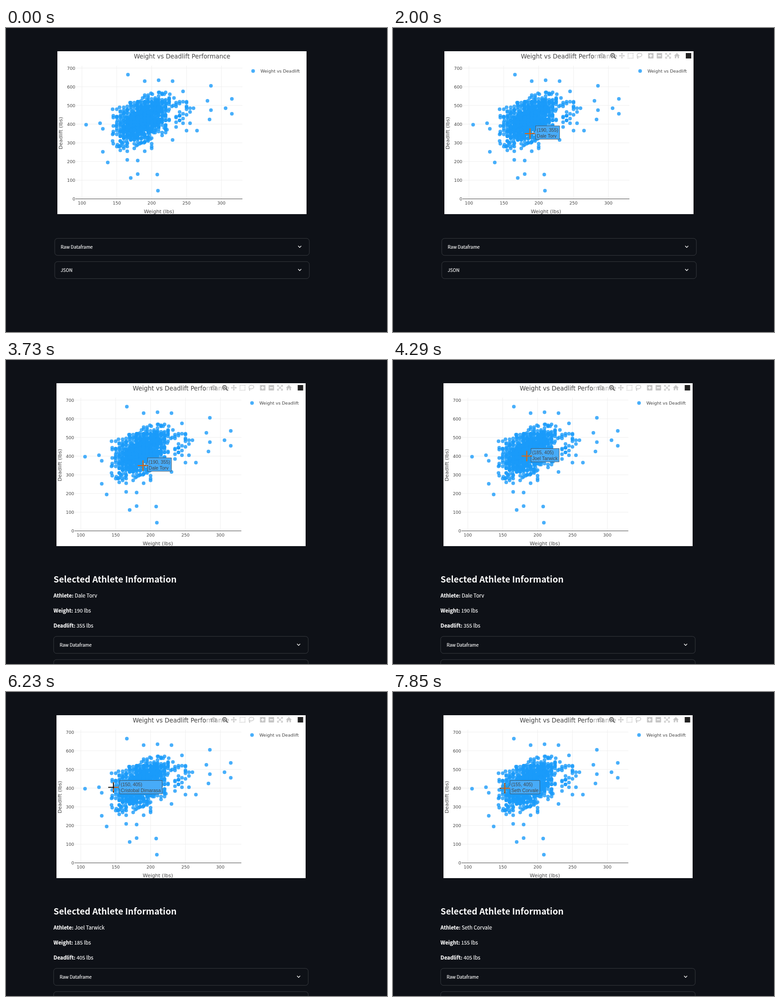
Recreate the animation shown at these times as an HTML page. Size 838 by 668 pixels, loop 8000 ms.

```html
<!DOCTYPE html>
<html lang="en">
<head>
<meta charset="utf-8">
<title>Weight vs Deadlift</title>
<style>
  html, body { margin: 0; width: 100%; height: 100%; overflow: hidden; background: #0e1117; }
  svg { display: block; }
  .plot text { font-family: "DejaVu Sans", Verdana, sans-serif; fill: #444; }
  .plot .tip text { font: 10.35px "Liberation Sans", Arial, sans-serif; }
  .page text { font-family: "Noto Sans CJK JP", "Noto Sans CJK SC", "Noto Sans", sans-serif; fill: #fafafa; }
  .page .body, .page .label { stroke: #fafafa; stroke-width: .2px; }
  .tick { font-size: 9.48px; }
  .axis { font-size: 11.05px; }
  .body { font-size: 11.3px; }
  .label { font-size: 9.95px; }
  .strong { font-weight: 700; }
  .hot text { fill: #ff4b4b; stroke: #ff4b4b; }
  .hot path { stroke: #ff4b4b; }
  #cross { mix-blend-mode: difference; }
</style>
</head>
<body>
<svg id="stage" width="838" height="668" viewBox="0 0 838 668">
  <rect width="838" height="668" fill="#0e1117"/>
  <g id="content">
    <g class="plot">
      <rect x="113" y="51" width="548" height="358" fill="#fff" shape-rendering="crispEdges"/>
      <g id="grid"></g>
      <g id="dots" fill="#1a9bfa" fill-opacity=".8"></g>
      <text x="387.3" y="66.7" font-size="13.43" text-anchor="middle">Weight vs Deadlift Performance</text>
      <text class="axis" x="336.5" y="406.6" text-anchor="middle">Weight (lbs)</text>
      <text class="axis" transform="translate(124.3 231) rotate(-90)" text-anchor="middle">Deadlift (lbs)</text>
      <text class="tick" x="559.7" y="97.8">Weight vs Deadlift</text>
      <g id="modebar"></g>
      <g id="tip" class="tip">
        <path fill="#47abf8" stroke="#444" stroke-width=".8"/>
        <text x="11.2" y="-2.2"></text><text x="11.2" y="11.2"></text>
      </g>
    </g>
    <g class="page">
      <g id="info">
        <text class="strong" x="107" y="489" font-size="19.1">Selected Athlete Information</text>
        <text class="body" x="107" y="521.5"><tspan class="strong">Athlete:</tspan> <tspan class="value"></tspan></text>
        <text class="body" x="107" y="555"><tspan class="strong">Weight:</tspan> <tspan class="value"></tspan></text>
        <text class="body" x="107" y="587.5"><tspan class="strong">Deadlift:</tspan> <tspan class="value"></tspan></text>
      </g>
      <g id="expanders"></g>
    </g>
  </g>
  <path id="cross" d="M-11.5 0H11.5M0 -11.5V11.5" stroke="#fff" stroke-width="2.2" fill="none"/>
  <path id="arrow" d="M0 0V15L3.5 11.8L5.8 17L8.2 16L6 10.8H10.6Z" fill="#fff" stroke="#000" stroke-width=".9"/>
  <path id="hand" d="M-1.6 1.2Q0 -1 1.6 1.2V6L9 7.6Q10.4 8 10 10L8.6 17H0L-5.6 10.4Q-5 8.4 -3 9.4L-1.6 10.6Z" fill="#fff" stroke="#000" stroke-width=".9"/>
</svg>
<script>
const LOOP = 8000;
const STEP = 70;
const HOVER_REACH = 16;
const $ = id => document.getElementById(id);
const toX = weight => 167 + 1.534 * (weight - 100);
const toY = lift => 375.5 - 0.4107 * lift;
const show = (node, on) => node.setAttribute('display', on ? 'inline' : 'none');
const clamp = v => Math.max(0, Math.min(1, v));

function drawGrid() {
  let out = '';
  for (let w = 100; w <= 300; w += 50) {
    out += `<path d="M${toX(w)} 83V375" stroke="#eee"/>` +
      `<text class="tick" x="${toX(w)}" y="388" text-anchor="middle">${w}</text>`;
  }
  for (let d = 0; d <= 700; d += 100) {
    out += `<path d="M153 ${toY(d)}H520" stroke="${d ? '#eee' : '#444'}"/>` +
      `<text class="tick" x="152.3" y="${toY(d) + 3.5}" text-anchor="end">${d}</text>`;
  }
  $('grid').innerHTML = out;
}

function seeded(seed) {
  return () => {
    seed = (seed + 0x6d2b79f5) | 0;
    let n = Math.imul(seed ^ (seed >>> 15), 1 | seed);
    n = (n + Math.imul(n ^ (n >>> 7), 61 | n)) ^ n;
    return ((n ^ (n >>> 14)) >>> 0) / 4294967296;
  };
}

// Athletes far from the crowd: weight, lift.
const outliers = [
  [106, 397], [126, 405], [130, 375], [130, 252], [137, 195], [165, 209], [180, 205],
  [170, 112], [180, 133], [208, 130], [209, 44], [166, 665], [190, 630], [210, 635],
  [230, 630], [245, 575], [285, 605], [280, 525], [315, 535], [306, 485], [315, 455],
  [285, 475], [283, 425], [265, 365], [250, 365], [230, 315]
];

function drawDots() {
  const rand = seeded(7);
  const bell = () => (rand() + rand() + rand() + rand() - 2) * 1.73;
  const snap = (v, step) => Math.round(v / step) * step;
  const dots = [...outliers];
  const scatter = (count, weight, width, lift, height) => {
    for (let i = 0; i < count; i++) {
      dots.push([snap(weight + rand() * width, 5), snap(lift + rand() * height, 5)]);
    }
  };
  scatter(26, 233, 28, 400, 125);
  scatter(14, 145, 58, 255, 50);
  for (let i = 0; i < 1000; i++) {
    const weight = Math.max(144, snap(187 + 18 * bell(), rand() < 0.65 ? 5 : 1));
    const offset = Math.max(-125, Math.min(125, 52 * bell()));
    dots.push([weight, Math.min(570, snap(428 + 1.45 * (weight - 190) + offset, 5))]);
  }
  $('dots').innerHTML = '<circle cx="543.5" cy="94.5" r="4"/>' + dots.map(([w, d]) =>
    `<circle cx="${toX(w).toFixed(1)}" cy="${toY(d).toFixed(1)}" r="4"/>`).join('');
}

function drawModebar() {
  const icon = (x, shape, alpha = 0.3) =>
    `<g transform="translate(${x} 61)" opacity="${alpha}" fill="#444">${shape}</g>`;
  const line = (d, width = 1.5) => `<path d="${d}" fill="none" stroke="#444" stroke-width="${width}"/>`;
  const box = '<rect x="-6" y="-6" width="12" height="12" rx="1.2"/>';
  const bar = '<path d="M-3.5 0H3.5" stroke="#fff" stroke-width="2"/>';
  $('modebar').innerHTML =
    '<rect x="443" y="52" width="217" height="18" fill="#fff" fill-opacity=".55"/>' +
    icon(459, '<path d="M-6.5 -3.5H-3L-2 -5.5H2L3 -3.5H6.5V5H-6.5Z"/><circle cy=".6" r="2.9" fill="#fff"/><circle cy=".6" r="1.6"/>') +
    icon(484, '<circle cx="-1" cy="-1" r="4" fill="none" stroke="#444" stroke-width="2"/>' +
      line('M2 2L6 6', 2.4) + line('M-3 -1H1M-1 -3V1', 1.2), 0.8) +
    icon(503.5, line('M-5 0H5M0 -5V5') +
      '<path d="M-6.5 0l3 -2.6v5.2zM6.5 0l-3 -2.6v5.2zM0 -6.5l-2.6 3h5.2zM0 6.5l-2.6 -3h5.2z"/>') +
    icon(522.5, '<rect x="-5.5" y="-5.5" width="11" height="11" fill="none" stroke="#444" stroke-width="1.6" stroke-dasharray="2.2 1.4"/>') +
    icon(542, '<ellipse cx=".4" cy="-1.5" rx="5.4" ry="4" fill="none" stroke="#444" stroke-width="1.5" transform="rotate(-12)"/>' +
      line('M-4 1.5Q-6 3 -4 4T-4.5 6.5')) +
    icon(567, box + bar + '<path d="M0 -3.5V3.5" stroke="#fff" stroke-width="2"/>') +
    icon(586, box + bar) +
    icon(605, line('M-4 -4L4 4M-4 4L4 -4') +
      line('M-5.5 -2V-5.5H-2M2 -5.5H5.5V-2M5.5 2V5.5H2M-2 5.5H-5.5V2')) +
    icon(624.5, '<path d="M0 -6L6.5 0H4.6V5.5H1.4V1.5H-1.4V5.5H-4.6V0H-6.5Z"/>') +
    '<rect x="644" y="55" width="12" height="12" fill="#222"/>';
}

function drawExpanders() {
  $('expanders').innerHTML = ['Raw Dataframe', 'JSON'].map((label, i) =>
    `<g transform="translate(0 ${i * 51})">
      <rect x="107.2" y="462.3" width="560" height="37.4" rx="6.3" fill="none" stroke="#3d4045" stroke-width=".9"/>
      <text class="label" x="120.3" y="485">${label}</text>
      <path d="M642.6 478.8L646 482.2L649.4 478.8" fill="none" stroke="#fafafa" stroke-width="1.4"/>
    </g>`).join('');
}

const person = (name, weight, lift) => ({ name, weight, lift });
const dale = person('Dale Torv', 190, 355);
const joel = person('Joel Tarwick', 185, 405);
const seth = person('Seth Corvale', 155, 405);
const athletes = [
  dale, joel, seth,
  person('Cristobal Dimarasa', 150, 405), person('Alan Mirvood', 208, 130),
  person('Ross Telmark', 195, 325), person('Kent Osterby', 190, 380),
  person('Ivan Quellor', 175, 405), person('Theo Brandal', 165, 400),
  person('Hugo Stenvik', 126, 405), person('Owen Tarsby', 143, 397)
];
const clicks = [
  { press: 2790, update: 3190, athlete: dale },
  { press: 5020, update: 5490, athlete: joel },
  { press: 7450, update: 7850, athlete: seth }
];
// Pointer keys: time, x, y.
const keys = [
  [460, 585, 655], [800, 497, 546], [1090, 371.5, 348.5], [1230, 335, 319], [1510, 303.5, 244],
  [1860, 303.5, 244], [2000, 301.3, 232], [3680, 301.3, 232], [4240, 294.3, 211],
  [5780, 294.3, 211], [6340, 217, 209], [6410, 235.5, 211], [6760, 235.5, 211],
  [7250, 244.9, 211], [7320, 246, 211.5]
];

function pointerAt(time) {
  const t = Math.floor((time - 40) / STEP) * STEP + 40;
  if (t < keys[0][0]) return null;
  const next = keys.findIndex(key => key[0] > t);
  const [t1, x1, y1] = keys.at(next < 0 ? -1 : next);
  const [t0, x0, y0] = keys.at(next < 0 ? -1 : next - 1);
  const u = t1 > t0 ? (t - t0) / (t1 - t0) : 0;
  const x = x0 + u * (x1 - x0);
  const y = y0 + u * (y1 - y0);
  const row = [462, 513].findIndex(top => y > top && y < top + 38);
  return { x, y, row, kind: y < 376 ? 'cross' : row < 0 ? 'arrow' : 'hand' };
}

function modebarAlpha(t) {
  const u = clamp((t - 960) / 300);
  let alpha = u * u * (3 - 2 * u);
  // A press covers the plot briefly, so the bar dims and returns.
  for (const { press } of clicks) {
    const d = t - press;
    if (d >= 0) alpha = Math.min(alpha, d < 130 ? 1 - 0.7 * d / 130 : 0.3 + 0.7 * clamp((d - 130) / 200));
  }
  return alpha;
}

function drawPointer(pointer) {
  for (const id of ['cross', 'arrow', 'hand']) {
    show($(id), pointer?.kind === id);
    if (pointer) $(id).setAttribute('transform', `translate(${pointer.x} ${pointer.y})`);
  }
  [...$('expanders').children].forEach((row, i) => row.classList.toggle('hot', pointer?.row === i));
}

function drawTip(pointer, shift) {
  const gap = a => Math.hypot(toX(a.weight) + shift - pointer.x, toY(a.lift) - pointer.y);
  const nearest = pointer && athletes.reduce((a, b) => (gap(b) < gap(a) ? b : a));
  const visible = Boolean(nearest) && gap(nearest) < HOVER_REACH;
  show($('tip'), visible);
  if (!visible) return;
  const { name, weight, lift } = nearest;
  const [shape, first, second] = $('tip').children;
  first.textContent = `(${weight}, ${lift})`;
  second.textContent = name;
  const width = 5.5 + Math.max(first.getComputedTextLength(), second.getComputedTextLength());
  shape.setAttribute('d', `M4 0L8.7 -4.7V-14.7H${8.7 + width}V14.7H8.7V4.7Z`);
  $('tip').setAttribute('transform', `translate(${toX(weight)} ${toY(lift)})`);
}

function drawInfo(athlete) {
  show($('info'), Boolean(athlete));
  if (!athlete) return;
  const values = [athlete.name, `${athlete.weight} lbs`, `${athlete.lift} lbs`];
  $('info').querySelectorAll('.value').forEach((node, i) => { node.textContent = values[i]; });
}

function render(t) {
  const athlete = clicks.filter(click => click.update <= t).pop()?.athlete;
  const shift = athlete ? -2.4 : 0;
  const pointer = pointerAt(t);
  drawInfo(athlete);
  drawTip(pointer, shift);
  drawPointer(pointer);
  $('content').setAttribute('transform', `translate(${shift} 0)`);
  $('expanders').setAttribute('transform', `translate(0 ${athlete ? 145 : 0})`);
  show($('expanders'), t < 3190 || t >= 3590);
  $('modebar').setAttribute('opacity', modebarAlpha(t));
}

drawGrid();
drawDots();
drawModebar();
drawExpanders();

const begin = performance.now();
function tick() {
  render((performance.now() - begin) % LOOP);
  requestAnimationFrame(tick);
}
tick();
</script>
</body>
</html>
```
